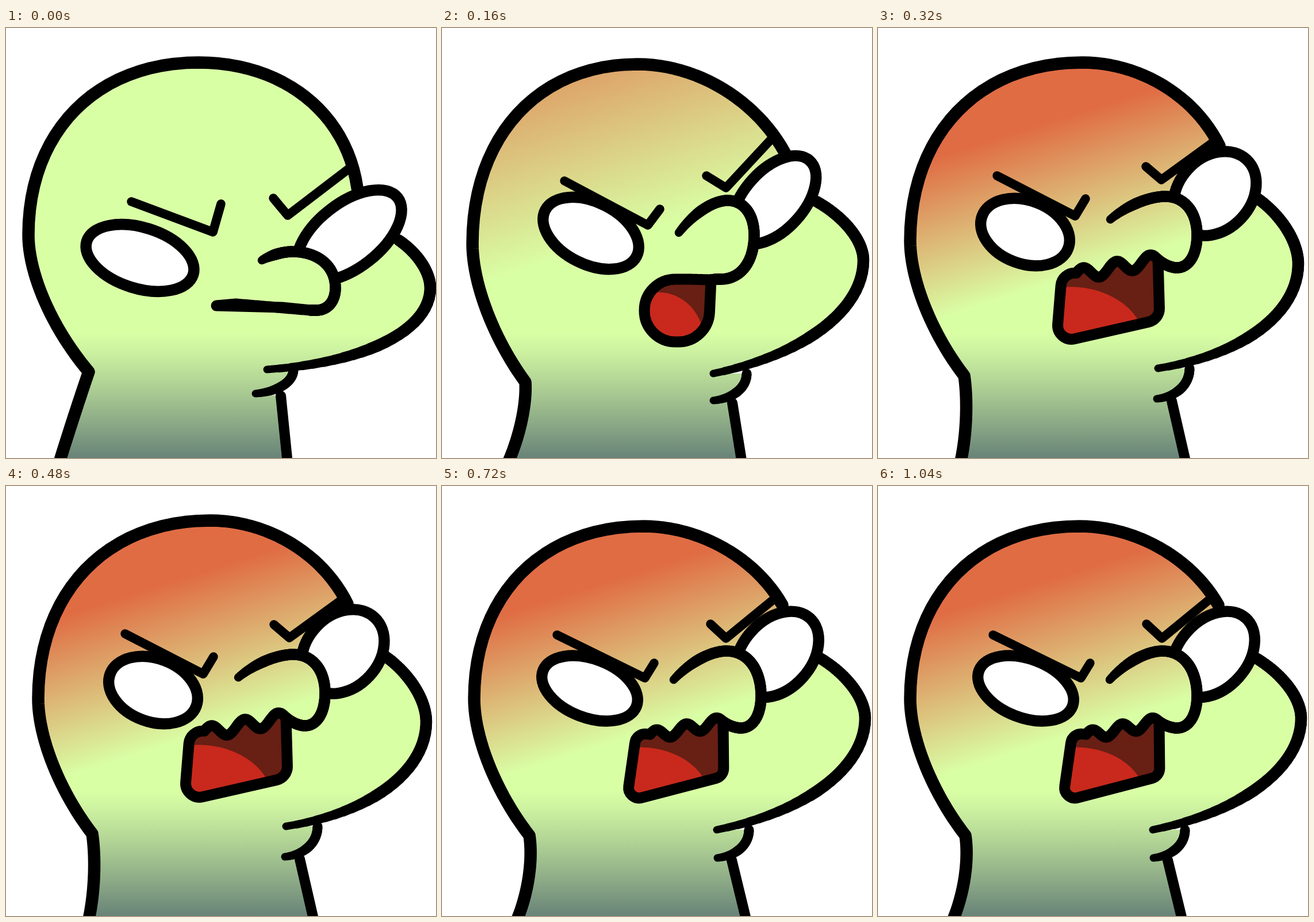
Recreate the animation shown at these times as an HTML page with a canvas. Size 748x748 px, loop 1120 ms.

```html
<!DOCTYPE html>
<html lang="en">
<head>
<meta charset="utf-8">
<title>Shouting face</title>
<style>
html, body { margin: 0; width: 100%; height: 100%; overflow: hidden; background: #fff; }
canvas { display: block; width: 748px; height: 748px; }
</style>
</head>
<body>
<canvas id="stage" width="748" height="748"></canvas>
<script>
const ctx = document.getElementById('stage').getContext('2d');
const STEP = 80, COUNT = 14, FLOOR = 758;
const GREEN = [217, 255, 165], RED = [224, 108, 68];

// Landmarks of a pose; every outline is derived from them.
// neck: foot x, bend x      head: corner, left, top, temple x, end
// cheek: start, right, jaw y, tip      chin: start x, end, neck x, foot x
// eyes: centre, radii, degrees      nose: tip, top, right, bottom
// mouth: lip start, then four corners      bite: corner radius, tooth height
const calm = {
  heat: [0], neck: [92, 116],
  head: [144, 598, 39, 360, 335, 60, 580, 611, 278],
  cheek: [683, 369, 738, 452, 575, 454, 594],
  chin: [500, 434, 636, 478, 490],
  eyeL: [233, 400, 97, 53, 17.4], eyeR: [597, 361, 107, 56, -38],
  browL: [218, 302, 360, 355, 374, 306], browR: [465, 296, 490, 326, 600, 242],
  nose: [445, 404, 498, 389, 573, 452, 540, 491],
  mouth: [400, 480, 366, 483, 366, 483, 480, 486, 530, 491], bite: [0, 0]
};
const open = {
  heat: [.6], neck: [114, 149],
  head: [145, 616, 53, 375, 340, 63, 513, 597, 218],
  cheek: [652, 302, 733, 404, 548, 472, 601],
  chin: [530, 472, 648, 505, 522],
  eyeL: [259, 357, 89, 54, 26.6], eyeR: [578, 299, 92, 52, -48],
  browL: [213, 266, 358, 343, 379, 315], browR: [460, 257, 494, 278, 574, 192],
  nose: [412, 356, 497, 300, 543, 360, 485, 437],
  mouth: [430, 437, 352, 437, 352, 546, 463, 546, 468, 438], bite: [54, 0]
};
const shoutUp = {
  heat: [1], neck: [143, 161],
  head: [150, 605, 56, 370, 355, 60, 523, 594, 205],
  cheek: [661, 297, 731, 410, 554, 487, 592],
  chin: [542, 485, 645, 511, 536],
  eyeL: [256, 355, 80, 55, 20.7], eyeR: [586, 288, 81, 63, -47],
  browL: [207, 257, 343, 327, 361, 297], browR: [466, 241, 493, 264, 588, 195],
  nose: [404, 333, 500, 293, 555, 360, 520, 417],
  mouth: [345, 430, 320, 425, 310, 548, 490, 507, 487, 403], bite: [24, 11]
};
const shoutDown = {
  heat: [1], neck: [129, 163],
  head: [152, 608, 56, 370, 350, 70, 514, 592, 207],
  cheek: [657, 299, 736, 404, 547, 478, 598],
  chin: [534, 479, 647, 504, 530],
  eyeL: [257, 352, 87, 51, 21], eyeR: [583, 293, 85, 60, -48],
  browL: [200, 259, 353, 334, 369, 308], browR: [467, 240, 494, 265, 582, 193],
  nose: [403, 337, 495, 287, 555, 365, 520, 421],
  mouth: [362, 435, 338, 430, 321, 549, 490, 505, 489, 410], bite: [18, 9]
};

const lerp = (a, b, u) => a + (b - a) * u;

function blend(a, b) {
  const out = {};
  for (const key in a) out[key] = a[key].map((v, i) => lerp(v, b[key][i], .5));
  return out;
}

// Two in-between steps on the way up, then a shake.
function poseAt(i) {
  const rise = [calm, blend(calm, open), open, blend(open, shoutUp)];
  return rise[i] || (i % 2 ? shoutDown : shoutUp);
}

// Smooth chain: point, corner, point, corner, ... point.
function chain(...p) {
  const out = [p[0]], n = 24, k = .6;
  for (let i = 0; i + 2 < p.length; i += 2) {
    const [a, q, b] = p.slice(i, i + 3);
    for (let s = 1; s <= n; s++) {
      const u = s / n, v = 1 - u;
      out.push([0, 1].map(j =>
        v * v * v * a[j] + 3 * v * v * u * lerp(a[j], q[j], k) +
        3 * v * u * u * lerp(b[j], q[j], k) + u * u * u * b[j]));
    }
  }
  return out;
}

function line(pts) {
  const path = new Path2D();
  pts.forEach(([x, y]) => path.lineTo(x, y));
  return path;
}

function oval([x, y, rx, ry, deg]) {
  const path = new Path2D();
  path.ellipse(x, y, rx, ry, deg * Math.PI / 180, 0, 2 * Math.PI);
  return path;
}

function ink(path, width) {
  ctx.lineWidth = width;
  ctx.stroke(path);
}

function fill(path, style) {
  ctx.fillStyle = style;
  ctx.fill(path);
}

// Ink that narrows towards its tips.
function taper(pts, w0, w, w1) {
  const n = pts.length - 1, reach = 10;
  for (let i = 0; i < n; i++) {
    const a = Math.min(1, i / reach), b = Math.min(1, (n - 1 - i) / reach);
    ink(line([pts[i], pts[i + 1]]), w - (w - w0) * (1 - a) - (w - w1) * (1 - b));
  }
}

function skin(heat) {
  const g = ctx.createLinearGradient(0, 0, 300, 954);
  const hot = GREEN.map((v, i) => lerp(v, RED[i], heat));
  g.addColorStop((40 + 205 * heat) / 1000, `rgb(${hot})`);
  g.addColorStop((340 + 175 * heat) / 1000, `rgb(${GREEN})`);
  return g;
}

function shade() {
  const g = ctx.createLinearGradient(0, 530, 0, 748);
  for (let u = 0; u <= 1; u += .125) {
    g.addColorStop(u, `rgba(104,131,120,${u ** 1.15})`);
  }
  return g;
}

function bodyEdges({ neck, head, cheek, chin }) {
  const [sx, sy, lx, ly, tx, ty, temple, ex, ey] = head;
  const [ax, ay, rx, ry, jaw, zx, zy] = cheek;
  const [cx, dx, dy, nx, foot] = chin;
  return [
    chain([neck[0], FLOOR], [neck[1], 680], [sx, sy]),
    chain([sx, sy], [lx, lerp(sy, ly, .52)], [lx, ly], [lx, ty],
      [tx, ty], [temple, ty], [ex, ey]),
    chain([ax, ay], [rx, lerp(ay, ry, .45)], [rx, ry], [rx, jaw], [zx, zy]),
    chain([cx, zy], [cx, dy - 6], [dx, dy]),
    [[nx, dy + 4], [foot, FLOOR]]
  ];
}

function noseLine({ nose, mouth }) {
  const [ax, ay, tx, ty, rx, ry, bx, by] = nose;
  const [mx, my] = mouth.slice(8);
  return chain([ax, ay], [lerp(ax, tx, .5), ty], [tx, ty], [rx, ty],
    [rx, ry], [rx, by], [bx, by], [(bx + mx) / 2, by], [mx, my]);
}

function mouthPath({ mouth, bite }) {
  const [wx, wy, ax, ay, bx, by, cx, cy, dx, dy] = mouth;
  const [r, tooth] = bite, path = new Path2D();
  for (let u = 1; u > -.01; u -= .02) {
    const wave = Math.cos(2 * Math.PI * (u - .285) / .41);
    path.lineTo(lerp(wx, dx, u), lerp(wy, dy, u) + tooth * wave);
  }
  path.arcTo(ax, ay, bx, by, r);
  path.arcTo(bx, by, cx, cy, r);
  path.arcTo(cx, cy, dx, dy, r);
  path.closePath();
  return path;
}

function drawMouth(pose) {
  const [, , , ay, bx, by, cx] = pose.mouth, lips = mouthPath(pose);
  fill(lips, '#681f14');
  ctx.save();
  ctx.clip(lips);
  fill(oval([bx + 25, by + 2, (cx - bx) * .72, (by - ay) * .81, 0]), '#c8291c');
  ctx.restore();
  ink(lips, 19);
}

function draw(i) {
  const pose = poseAt(i), tone = skin(pose.heat[0]);
  ctx.fillStyle = '#fff';
  ctx.fillRect(0, 0, 748, 748);
  ctx.lineCap = ctx.lineJoin = 'round';

  const edges = bodyEdges(pose), body = line(edges.flat());
  fill(body, tone);
  fill(body, shade());
  ink(line([...edges[0], ...edges[1]]), 21.5);
  taper(edges[2], 20, 20.5, 13);
  taper(edges[3], 17, 17, 13);
  ink(line(edges[4]), 18);

  for (const eye of [pose.eyeL, pose.eyeR]) {
    fill(oval(eye), '#fff');
    ink(oval(eye), 19.5);
  }
  const nose = noseLine(pose);
  fill(line(nose), tone);
  for (const [ax, ay, bx, by, cx, cy] of [pose.browL, pose.browR]) {
    ink(line([[ax, ay], [bx, by], [cx, cy]]), 15.5);
  }
  drawMouth(pose);
  taper(nose, 14.5, 19.5, 19.5);
}

let shown = -1;
function tick() {
  const i = Math.floor(performance.now() / STEP) % COUNT;
  if (i !== shown) draw(shown = i);
  requestAnimationFrame(tick);
}
tick();
</script>
</body>
</html>
```
